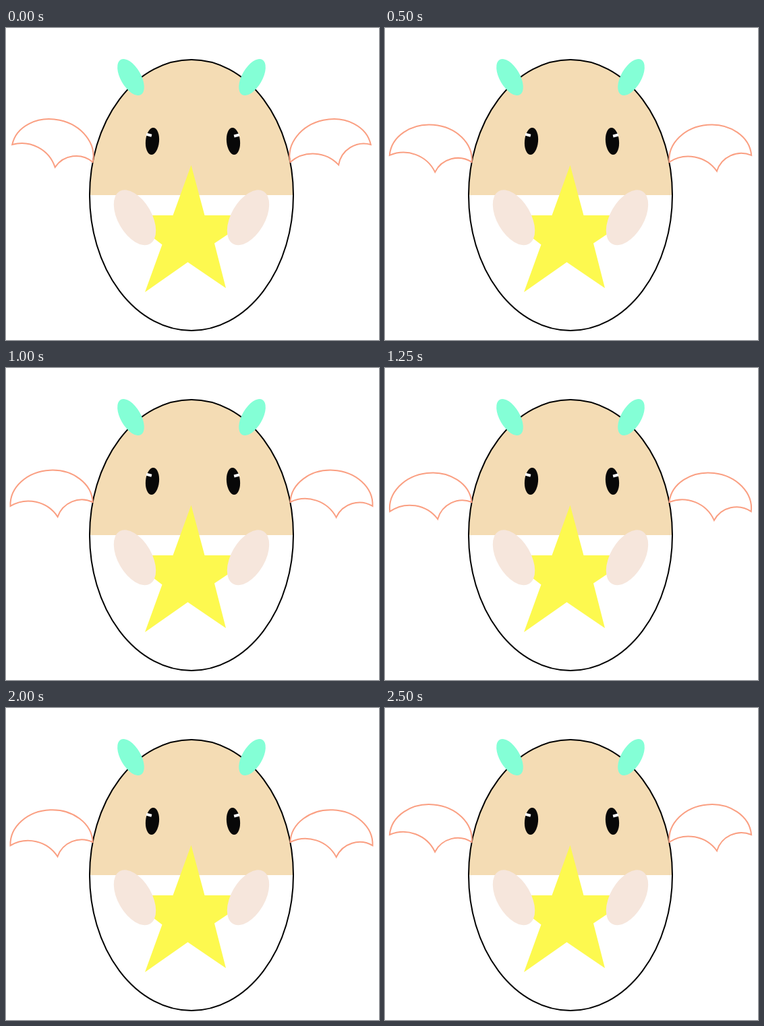
An HTML page with a canvas for the animation above (2750 ms loop, 553 by 463 pixels).

```html
<!DOCTYPE html>
<html lang="en">
<head>
<meta charset="utf-8">
<title>Winged egg</title>
<style>
  html, body { margin: 0; width: 100%; height: 100%; overflow: hidden; background: #fff; }
  canvas { display: block; }
</style>
</head>
<body>
<canvas id="stage" width="553" height="463"></canvas>
<script>
const ctx = document.getElementById('stage').getContext('2d');
const LOOP = 2750, STEP = 250;
const WING_SPAN = 122.2;
const REST_TILT = 12.3, TILT_PER_STEP = 3.77;
const rad = deg => deg * Math.PI / 180;

// Outer half ellipse, then two scallops meeting at a cusp.
const wingPath = new Path2D(
  `M0 0A61.1 50.3 0 0 1 ${WING_SPAN} 0A38 38 0 0 0 69.2 19.3A52 52 0 0 0 0 0Z`);
const starPath = new Path2D(
  'M274.5 203.5L294.5 278H371L309 319.5L326 386L269.5 347.5L206 392L231.5 321.5L175 278H247.5Z');

function oval(x, y, rx, ry, tilt, color) {
  ctx.fillStyle = color;
  ctx.beginPath();
  ctx.ellipse(x, y, rx, ry, rad(tilt), 0, 2 * Math.PI);
  ctx.fill();
}

function glint(x, y, tilt) {
  ctx.save();
  ctx.translate(x, y);
  ctx.rotate(rad(tilt));
  ctx.fillStyle = '#fff';
  ctx.fillRect(-4, -2, 8, 4);
  ctx.restore();
}

function egg() {
  const path = new Path2D();
  path.ellipse(275, 248, 151, 201, 0, 0, 2 * Math.PI);
  ctx.save();
  ctx.clip(path);
  ctx.fillStyle = '#f4dcb4';
  ctx.fillRect(124, 47, 302, 201);
  ctx.restore();
  ctx.lineWidth = 2;
  ctx.strokeStyle = '#000';
  ctx.stroke(path);
}

function wing(rootX, tilt, anchor) {
  ctx.save();
  ctx.translate(rootX, 199);
  ctx.rotate(rad(tilt));
  ctx.translate(-anchor, 0);
  ctx.lineWidth = 2;
  ctx.strokeStyle = '#fa9f82';
  ctx.stroke(wingPath);
  ctx.restore();
}

// Wings drop for six steps, then rise again.
function wingTilt(time) {
  const step = Math.floor((time % LOOP) / STEP);
  const drop = step <= 6 ? TILT_PER_STEP * step : TILT_PER_STEP * (12 - step) - 0.4;
  return REST_TILT - drop;
}

function draw(time) {
  ctx.fillStyle = '#fff';
  ctx.fillRect(0, 0, 553, 463);
  egg();

  oval(185, 73, 15, 30, -30, '#84ffd6');
  oval(365, 73, 15, 30, 30, '#84ffd6');

  oval(217, 168, 10, 20, 5, '#080808');
  oval(337, 168, 10, 20, -5, '#080808');
  glint(212, 158.7, 15);
  glint(342, 159.5, -15);

  ctx.fillStyle = '#fdf94f';
  ctx.fill(starPath);

  oval(191, 281.3, 25, 45, -30, '#f6e6dc');
  oval(359, 281.3, 25, 45, 30, '#f6e6dc');

  const tilt = wingTilt(time);
  wing(128.6, tilt, WING_SPAN);
  wing(421.4, -tilt, 0);
}

let start;
function tick(now) {
  start ??= now;
  draw(Math.max(0, now - start));
  requestAnimationFrame(tick);
}
draw(0);
requestAnimationFrame(tick);
</script>
</body>
</html>
```
